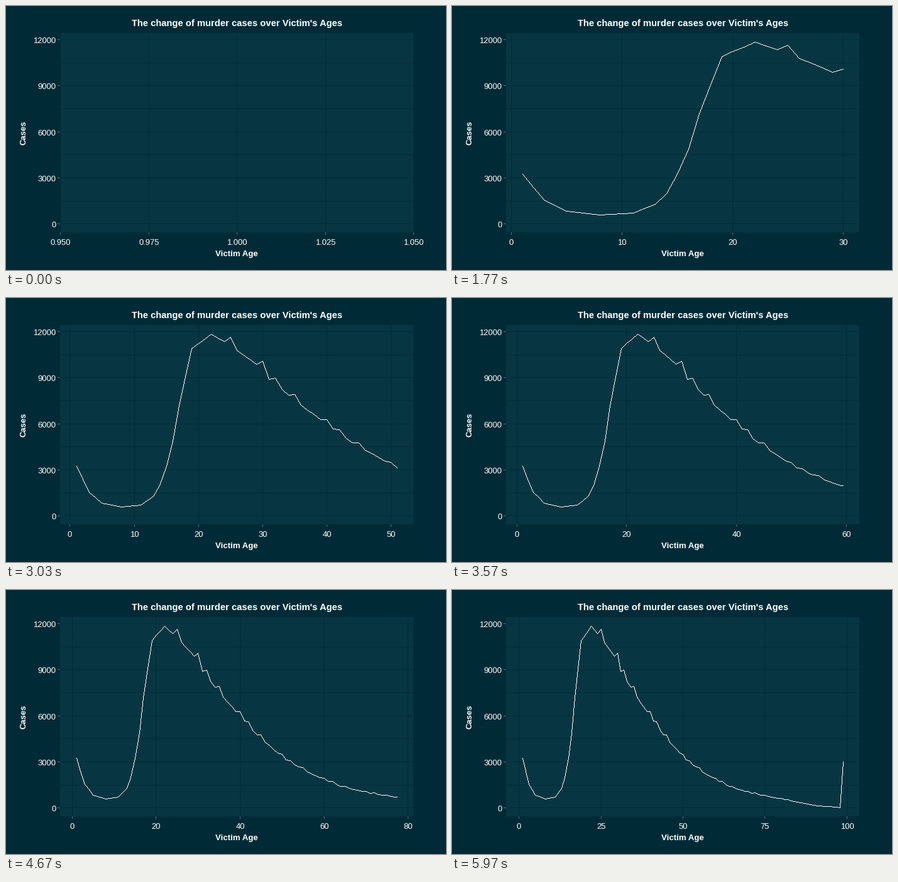
Recreate the animation shown at these times as a matplotlib script. Size 700 by 420 pixels, loop 10000 ms.

```python
import math

import matplotlib.pyplot as plt
import numpy as np
from matplotlib.animation import FuncAnimation
from matplotlib.collections import PolyCollection

W, H, DPI = 700, 420, 100
FRAMES, LAST_STEP, LOOP_MS = 301, 179, 10000
PX = 72 / DPI
BACK, PANEL, TICK, INK = "#002b36", "#073642", "#586e75", "white"
LEFT, RIGHT, TOP, BOTTOM = 86, 648, 43, 360

# Trend of cases by age; between the turning points it is close to linear.
TURNS = [(1, 3256), (3, 1540), (5, 840), (8, 600), (11, 690), (13, 1260),
         (14, 1990), (15, 3260), (16, 4900), (17, 7190), (19, 10900),
         (22, 11850), (24, 11360), (30, 9600), (31, 8900), (36, 7200),
         (44, 4750), (51, 3100), (57, 2200), (64, 1400), (70, 1010),
         (90, 160), (98, 10), (99, 2990)]
AGES = np.arange(1, 100)
# Adult ages ending in 0, 2 or 5 are reported a little more often.
HEAPED = (AGES >= 25) & np.isin(AGES % 10, (0, 2, 5))
CASES = np.interp(AGES, *zip(*TURNS)) * np.where(HEAPED, 1.05, 1)
# Each age is reached on a whole step, so the line moves by halves or ones.
ARRIVAL = np.round((AGES - 1) * LAST_STEP / 98)

plt.rcParams["font.family"] = "Liberation Sans"
fig = plt.figure(figsize=(W / DPI, H / DPI), dpi=DPI, facecolor=BACK)
ax = fig.add_axes([0, 0, 1, 1])
ax.set(xlim=(0, W), ylim=(H, 0))
ax.axis("off")


def y_pixel(cases):
    return 346.65 - np.asarray(cases) * 293 / 12000


def box(x, y, w, h, color, z=2):
    return ax.fill([x, x + w, x + w, x], [y, y, y + h, y + h],
                   color=color, lw=0, snap=False, zorder=z)[0]


def label(x, y, text, size=13, **kw):
    style = dict(ha="center", va="baseline", color=INK)
    return ax.text(x, y, text, fontsize=size * PX, **{**style, **kw})


def pixel_line(xs, ys):
    """Unit squares along an unsmoothed one-pixel polyline."""
    xs, ys = np.floor(xs), np.floor(ys)
    dots = []
    for x0, y0, x1, y1 in zip(xs, ys, xs[1:], ys[1:]):
        n = int(max(abs(x1 - x0), abs(y1 - y0))) + 1
        dots.append(np.column_stack([np.linspace(x0, x1, n), np.linspace(y0, y1, n)]))
    corners = np.unique(np.floor(np.vstack(dots) + 0.5), axis=0)
    return corners[:, None] + np.array([[0, 0], [1, 0], [1, 1], [0, 1]])


def nice_breaks(lo, hi, m=5):
    """Extended Wilkinson labelling: simplicity, coverage and density."""
    nice = [1, 5, 2, 2.5, 4, 3]
    span = hi - lo
    best, result = -2, []
    for i, q in enumerate(nice):
        for k in range(2, 10):
            z0 = math.ceil(math.log10(span / (k + 1) / q))
            for step in (q * 10.0 ** z0, q * 10.0 ** (z0 + 1)):
                first = math.floor(hi / step) - (k - 1)
                for start in range(first, math.ceil(lo / step) + 1):
                    a = start * step
                    b = a + step * (k - 1)
                    simple = (a <= 0 <= b) - i / (len(nice) - 1)
                    cover = 1 - 50 * ((hi - b) ** 2 + (lo - a) ** 2) / span ** 2
                    ratio = (k - 1) / (b - a) * (max(b, hi) - min(a, lo)) / (m - 1)
                    dense = 2 - max(ratio, 1 / ratio)
                    score = 0.25 * simple + 0.2 * cover + 0.5 * dense
                    if score > best + 1e-12:
                        best = score
                        result = [a + step * n for n in range(k)]
    eps = span * 1e-6
    return [b for b in result if lo - eps <= b <= hi + eps]


def decimals(values):
    return next(d for d in range(8)
                if all(abs(v - round(v, d)) < 1e-7 for v in values))


box(LEFT, TOP, RIGHT - LEFT, BOTTOM - TOP, PANEL, 1)
for value in range(0, 12001, 1500):
    row = math.floor(y_pixel(value))
    box(LEFT, row, RIGHT - LEFT, 1, BACK)
    if value % 3000 == 0:
        box(LEFT - 4, row, 4, 1, TICK)
        label(79.5, row + 6, str(value), ha="right")
label(367.5, 32, "The change of murder cases over Victim's Ages", 14.7, weight="bold")
label(366.5, 398, "Victim Age", 13.3, weight="bold")
label(31.5, 202, "Cases", weight="bold", rotation=90, rotation_mode="anchor")

curve = ax.add_collection(
    PolyCollection([], facecolors=INK, edgecolors="none", snap=False, zorder=5),
    autolim=False)
moving = []


def draw(frame):
    while moving:
        moving.pop().remove()
    age = np.interp(frame, ARRIVAL, AGES)
    pad = 0.05 * (age - 1) if frame else 0.05
    lo, hi = 1 - pad, age + pad

    def x_pixel(v):
        return LEFT + 0.5 + (np.asarray(v) - lo) / (hi - lo) * (RIGHT - LEFT)

    breaks = nice_breaks(lo, hi)
    places = decimals(breaks)
    for value in breaks:
        col = math.floor(x_pixel(value) + 1e-6)
        moving.append(box(col, TOP, 1, BOTTOM - TOP, BACK))
        moving.append(box(col, BOTTOM, 1, 4, TICK))
        moving.append(label(col + 0.5, 380, f"{abs(value):.{places}f}"))

    if frame == 0:
        curve.set_verts([])
    else:
        xs = np.append(AGES[AGES < age], age)
        curve.set_verts(pixel_line(x_pixel(xs), y_pixel(np.interp(xs, AGES, CASES))))
    return [curve, *moving]


anim = FuncAnimation(fig, draw, frames=FRAMES, interval=LOOP_MS / FRAMES,
                     init_func=lambda: draw(0), repeat=True, repeat_delay=0, blit=False)
plt.show()
```
